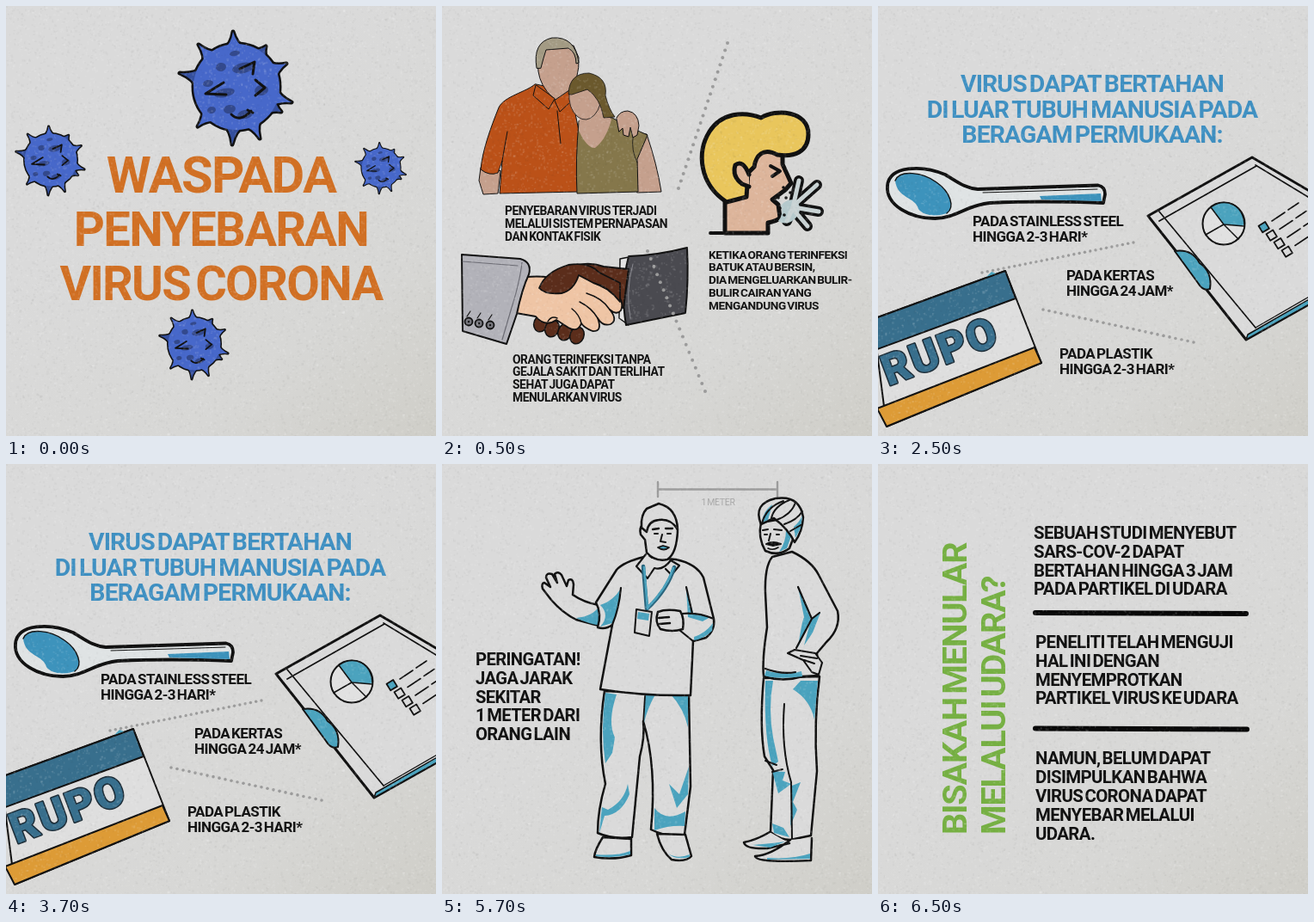
An HTML page with a canvas that plays this animation: 500x500 px, repeating every 8 s.

```html
<!DOCTYPE html>
<html lang="id">
<head>
<meta charset="utf-8">
<title>Waspada penyebaran virus corona</title>
<style>
html, body { margin: 0; width: 100%; height: 100%; overflow: hidden; background: #dcdcdc; }
canvas { display: block; width: 500px; height: 500px; }
</style>
</head>
<body>
<canvas id="stage" width="500" height="500"></canvas>
<script>
const stage = document.getElementById('stage');
const ctx = stage.getContext('2d');
const INK = '#111', TEAL = '#4ba3be', SKIN = '#c5a08d', PAPER = '#dadada', DOT = '#9b9b9b';

function shape(d, fill, stroke, width = 2) {
  const path = new Path2D(d);
  if (fill) { ctx.fillStyle = fill; ctx.fill(path); }
  if (stroke) { ctx.strokeStyle = stroke; ctx.lineWidth = width; ctx.stroke(path); }
}

function ellipse(x, y, rx, ry, fill, stroke, width = 2, turn = 0) {
  ctx.beginPath();
  ctx.ellipse(x, y, rx, ry, turn, 0, 7);
  if (fill) { ctx.fillStyle = fill; ctx.fill(); }
  if (stroke) { ctx.strokeStyle = stroke; ctx.lineWidth = width; ctx.stroke(); }
}

function text(lines, x, y, size, pitch, color = INK, weight = 700, align = 'left') {
  ctx.font = `${weight} ${size}px Roboto, Inter, sans-serif`;
  ctx.letterSpacing = -0.03 * size + 'px';
  ctx.wordSpacing = -0.11 * size + 'px';
  ctx.textAlign = align;
  ctx.fillStyle = color;
  lines.split('|').forEach((line, i) => ctx.fillText(line, x, y + i * pitch));
}

function dots(x1, y1, x2, y2, count, r) {
  for (let i = 0; i <= count; i++) {
    const k = i / count;
    ellipse(x1 + (x2 - x1) * k, y1 + (y2 - y1) * k, r, r, DOT);
  }
}

function local(x, y, scale, turn, draw) {
  ctx.save();
  ctx.translate(x, y);
  ctx.scale(scale, scale);
  ctx.rotate(turn);
  draw();
  ctx.restore();
}

function virus(x, y, scale) {
  const tips = [[-66, -16, 1], [34, -47, 1], [-5, 67, 1], [52, 29, 1], [-4, -64], [58, -27],
    [64, 18], [27, 60], [-45, 46], [-44, -49]];
  const spike = ([tx, ty, dark], outline) => {
    const a = Math.atan2(ty, tx);
    const at = (r, da) => `${r * Math.cos(a + da)},${r * Math.sin(a + da)}`;
    shape(`M${at(46, -.28)}Q${at(50, -.06)} ${tx},${ty}Q${at(50, .06)} ${at(46, .28)}Z`,
      outline ? null : dark ? '#344f9d' : '#4768ca', outline && INK, 5);
  };
  local(x, y, scale, 0, () => {
    tips.forEach(t => spike(t, true));
    ellipse(0, 0, 50, 50, null, INK, 5);
    tips.forEach(t => spike(t, false));
    ellipse(0, 0, 50, 50, '#4768ca');
    const spots = [[-18, -23, 6, 5], [8, -22, 13, 6], [-33, -4, 6, 4], [-14, 7, 12, 5], [29, 4, 8, 6],
      [-29, 27, 5, 4], [-8, 26, 7, 5], [10, 32, 9, 5], [-2, -39, 6, 3]];
    spots.forEach(([sx, sy, rx, ry]) => ellipse(sx, sy, rx, ry, '#33498d', null, 0, -.2));
    shape('M-15,-5L-36,8 -12,9 M22,-8L33,1 22,10 M4,-21L21,-29 19,-15 M-6,32Q4,42 17,28 M13,27L19,30', null, INK, 3);
  });
}

function titleScene() {
  virus(268, 94, 1);
  virus(52, 179, .61);
  virus(436, 188, .45);
  virus(219, 393, .61);
  const color = '#d17024';
  text('WASPADA', 250, 217, 59.5, 0, color, 700, 'center');
  text('PENYEBARAN|VIRUS CORONA', 250, 279, 56, 63, color, 700, 'center');
}

function couple() {
  const orange = '#bb5118', olive = '#85774b';
  shape('M45,188L43,203 48,219 65,218 68,192Z', SKIN, INK, 1);
  shape('M108,91C98,100 72,105 66,118C56,143 47,168 45,190Q55,198 65,194L70,180 67,218 158,216 160,150 150,100Z', orange, INK, 1);
  shape('M111,60L112,76Q114,92 128,106L136,113 148,101Q160,84 159,60L153,46H120Z', SKIN, INK, 1);
  shape('M110,72Q105,42 128,37Q155,35 159,66L156,67Q156,54 147,49L121,51Q118,60 115,72Z', '#a39b84', INK, 1);
  shape('M109,92L106,104 124,120 131,108Z M150,97L151,110 137,123 131,110Z', orange, INK, 1);
  shape('M134,122L138,160 M70,180L76,146', null, INK, 1);
  shape('M222,148L238,149Q250,184 255,216L227,217Z', SKIN, INK, 1);
  shape('M159,134Q155,180 157,218L228,216 227,178 239,150 214,139 198,130Z', olive, INK, 1);
  shape('M160,125L159,145Q169,166 178,165Q191,155 197,132L184,116Z', SKIN);
  shape('M148,99Q146,119 158,129Q168,136 177,127Q187,116 184,99L171,88Z', SKIN, INK, .8);
  shape('M147,102Q148,78 171,78Q193,83 190,104Q194,120 201,129L188,130Q184,107 169,97L151,103Z', '#6b592d', INK, .8);
  shape('M203,130Q207,122 216,122Q228,124 229,139L227,150 222,153 219,141 217,152 211,150 210,142 206,146Z', SKIN, INK, 1);
  shape('M222,153Q220,168 227,182', null, INK, .8);
}

function sneeze() {
  shape('M329,218V264H379V252Q390,250 393,246L391,231 384,225 399,214 406,206 396,184V165L360,148 330,190Z', '#ddb59b', INK, 5);
  shape('M331,228C299,207 296,170 311,146C325,124 351,122 371,130C388,119 426,122 426,149C426,170 409,176 390,173C373,164 365,174 363,187L356,194 354,222Z', '#e9c65c', INK, 5);
  shape('M357,196Q350,178 341,185Q337,198 349,207L357,210', '#ddb59b', INK, 5);
  shape('M382,186L393,192 384,198 M312,264H379', null, INK, 4);
  const rays = 'M408,234L415,203 M409,232L436,208 M409,234L438,239 M408,236L425,256 M408,234L401,250';
  shape(rays, null, INK, 12);
  shape('M394,232Q403,222 413,227Q420,238 410,248Q400,256 391,250Q398,241 394,232Z', '#b5c9cc');
  shape(rays, null, '#c9d3d4', 5);
  [[391, 223], [397, 211], [400, 223], [393, 235], [398, 243], [405, 217]].forEach(([x, y]) => ellipse(x, y, 1.8, 1.8, INK));
}

function handshake() {
  const light = '#efc5a5', dark = '#5b2d1b';
  shape('M207,294L222,291 217,371 206,363Z', '#e4e4e4', INK, 1.5);
  shape('M217,291Q250,290 285,281Q287,320 283,357L214,371Q207,330 217,291Z', '#4a4a50', INK, 2);
  shape('M222,300Q213,332 219,363', null, '#898990', 1);
  [[115, 369], [128, 375], [143, 379], [157, 383]].forEach(([x, y]) => ellipse(x, y, 8, 10, dark, INK, 1.5, .4));
  shape('M145,306Q166,295 188,303L217,306 211,351 190,343 145,333Z', dark, INK, 2);
  shape('M98,315Q122,313 140,319L160,311Q178,324 199,332Q213,342 208,354Q203,360 195,353Q205,365 196,370Q187,373 181,363Q187,379 175,378Q165,374 162,369Q158,380 147,374L133,365Q120,374 109,361L86,357Z', light, INK, 1.8);
  shape('M113,328Q120,309 147,301Q171,297 183,310L207,322V344Q193,326 176,322L159,313Q153,331 139,334Q120,336 113,328Z', dark, INK, 1.8);
  shape('M168,334Q187,340 195,353 M160,344Q174,351 181,363 M151,352Q160,359 162,369 M123,367Q127,360 134,363', null, INK, 1.5);
  shape('M23,289L91,294Q105,298 101,312Q93,329 87,358L75,393 24,378Z', '#b2b2b9', INK, 2);
  shape('M93,298Q91,319 80,354L70,388 M24,297L88,302', null, '#6c6c74', 1.2);
  [31, 43, 56].forEach((x, i) => {
    ellipse(x, 367 + i * 2, 4.5, 4.5, '#77777e', INK, 1.8);
    ellipse(x, 367 + i * 2, 1.2, 1.2, INK);
    shape(`M${x - 2},${361 + i * 2}l4,-6`, null, INK, 1.2);
  });
}

function spreadScene() {
  couple();
  sneeze();
  handshake();
  dots(332, 43, 275, 212, 20, 2);
  dots(239, 285, 306, 448, 18, 2);
  text('PENYEBARAN VIRUS TERJADI|MELALUI SISTEM PERNAPASAN|DAN KONTAK FISIK', 73, 243, 13.8, 14.8);
  text('KETIKA ORANG TERINFEKSI|BATUK ATAU BERSIN,|DIA MENGELUARKAN BULIR-|BULIR CAIRAN YANG|MENGANDUNG VIRUS', 310, 293.5, 13.6, 14.8);
  text('ORANG TERINFEKSI TANPA|GEJALA SAKIT DAN TERLIHAT|SEHAT JUGA DAPAT|MENULARKAN VIRUS', 82, 415.5, 13.8, 14.7);
}

function spoon() {
  shape('M11,209C13,185 52,185 78,196C92,204 101,212 116,213L256,208.5Q264,210 264,219L262,229Q190,226 130,229C104,231 90,247 66,247C38,247 9,232 11,209Z', '#dfe3e4', INK, 3.8);
  shape('M20,203C25,190 52,193 68,205C84,216 90,234 80,241C66,246 52,243 47,236C44,222 22,224 20,203Z', '#3d93bc');
  shape('M20,203C25,190 52,193 68,205C84,216 90,234 80,241', null, INK, 1.4);
  shape('M188,221L259,218 260,227 190,225Z', '#3d93bc');
  shape('M122,217L190,215 255,213', null, INK, 1);
}

function book() {
  shape('M435,176L314,244 428,388 510,342V220Z', PAPER, INK, 3);
  shape('M428,388L510,342V336L430,382Z', TEAL, INK, 1.5);
  shape('M440,186L327,250 M435,176L510,220 M439,185L510,228 M327,239L439,374', null, INK, 1.7);
  shape('M345,285Q365,282 374,299Q389,309 386,329Q378,332 372,322Z', TEAL, INK, 2);
  shape('M439,374L510,333', null, INK, 1.3);
  ellipse(402, 253, 24.5, 24.5, '#e1e1e1', INK, 2);
  shape('M402,254L387,234Q400,225 413,231Q426,238 426,256Z', TEAL, INK, 1.5);
  shape('M402,254L381,266 M402,254L419,271', null, INK, 1.5);
  for (let i = 0; i < 4; i++) {
    const x = 448 + i * 9, y = 257 + i * 9.5;
    local(x, y, 1, -.55, () => {
      ctx.lineWidth = 1.8;
      ctx.strokeStyle = INK;
      ctx.fillStyle = i ? PAPER : TEAL;
      ctx.fillRect(-4, -4, 9, 9);
      ctx.strokeRect(-4, -4, 9, 9);
    });
    shape(`M${x + 10},${y - 7}l15,-10m4,-3l12,-8`, null, INK, 1.6);
  }
}

function card() {
  const blue = '#386f8d';
  shape('M-6,364L148,308 190,415 10,489Z', '#dedede', INK, 2);
  shape('M-6,364L148,308 160,340 -6,401Z', blue, INK, 2);
  shape('M-1,468L182,397 190,415 10,489Z', '#dd9b36', INK, 2);
  shape('M126,315L132,309 137,311Z', TEAL);
  local(12, 442, 1, -.36, () => {
    ctx.font = '900 50px Roboto, Inter, sans-serif';
    ctx.letterSpacing = '2px';
    ctx.textAlign = 'left';
    ctx.lineWidth = 3;
    ctx.strokeStyle = '#1d2d38';
    ctx.fillStyle = blue;
    ctx.strokeText('RUPO', 0, 0);
    ctx.fillText('RUPO', 0, 0);
  });
}

function surfaceScene() {
  text('VIRUS DAPAT BERTAHAN|DI LUAR TUBUH MANUSIA PADA|BERAGAM PERMUKAAN:', 249, 100, 28.4, 29.7, '#3f90c2', 700, 'center');
  spoon();
  book();
  dots(297, 275, 121, 310, 28, 1.7);
  dots(192, 353, 367, 391, 25, 1.8);
  card();
  text('PADA STAINLESS STEEL|HINGGA 2-3 HARI*', 110, 256, 17, 18);
  text('PADA KERTAS|HINGGA 24 JAM*', 219, 319, 17, 18);
  text('PADA PLASTIK|HINGGA 2-3 HARI*', 211, 410, 17, 18);
}

const LINE = 2.5;

function speaker() {
  shape('M189,264Q180,322 190,372Q181,402 181,429Q199,437 221,434L230,340Q236,318 234,299Q250,352 243,425Q263,435 282,431L289,375 287,268Z', PAPER, INK, LINE);
  shape('M190,266L203,268Q192,300 201,318L198,336 190,348Q184,310 190,266Z M216,372Q212,392 193,402L186,399Q184,416 183,429L189,409Q208,408 218,384Z M236,268H248Q238,286 235,301Z M266,268L286,270 286,306Q281,284 266,268Z M247,400Q260,417 283,404L282,421Q264,420 247,426Z M287,352L276,384 264,372 273,400 286,384Z', TEAL);
  shape('M236,270L234,302', null, INK, 1.8);
  shape('M187,434Q178,448 177,457Q200,461 220,455V436Z M250,430Q255,450 267,460Q284,463 290,456L283,431Z', PAPER, INK, LINE);
  shape('M179,454Q203,456 219,450V454Q199,459 179,456Z M263,453Q274,460 288,454L288,457Q271,461 263,453Z', TEAL);
  shape('M182,164Q165,161 152,152L153,140Q152,132 147,135L145,142 139,129Q135,124 131,128L134,138 128,128Q121,126 121,132L126,143 119,138Q115,139 117,145L127,158Q140,173 156,181L186,189Z', PAPER, INK, LINE);
  shape('M156,179Q176,177 183,165L186,188Q170,186 156,179Z', TEAL);
  shape('M235,108Q211,114 203,123L179,161Q186,174 181,190Q190,193 198,187L184,262Q235,270 289,269L292,206 307,202Q318,193 316,180L304,132Q296,116 272,111Z', PAPER, INK, LINE);
  shape('M184,164Q198,160 208,145Q207,168 198,185L184,189Q196,176 184,164Z M284,145L292,173 312,178 303,183 286,178Z M293,201Q306,197 315,185L314,194Q305,203 293,205Z', TEAL);
  shape('M208,144Q206,168 198,187 M284,143L291,174 M279,174Q297,172 316,180 M276,193L292,206', null, INK, 2.2);
  shape('M251,172Q261,168 277,171Q282,179 280,192Q268,196 254,192Q247,184 251,172Z M252,179L264,178 M253,186L265,185', PAPER, INK, LINE);
  shape('M237,105L226,119 239,133 247,121Q257,124 266,112L276,118 267,129 260,122', PAPER, INK, 2.2);
  shape('M234,119L238,168 M270,120Q263,145 239,168', null, '#29647c', 4.5);
  shape('M235,120L239,168 M269,121Q261,145 239,167', null, TEAL, 2.5);
  shape('M226,169L244,172 241,200 224,196Z', PAPER, INK, 2);
  shape('M228,172L241,174 240,182 227,180Z', TEAL);
  shape('M234,70Q229,74 231,82L236,88 238,103Q248,114 262,111Q273,104 274,77L269,58 240,57Z', PAPER, INK, LINE);
  shape('M232,74Q231,59 238,52L252,46Q273,51 274,76Q266,63 252,65Q240,66 238,79Z', PAPER, INK, LINE);
  shape('M245,76L252,75 M260,75L268,75', null, INK, 2.3);
  shape('M247,81L251,81 M262,81L266,81 M256,82L254,90 260,91', null, INK, 2);
  shape('M251,97L257,95 264,97Q258,102 251,97Z', TEAL, INK, 1.8);
}

function listener() {
  shape('M374,249Q369,305 375,340L385,356 382,428Q393,437 405,437L429,432 436,357Q432,300 439,247Z', PAPER, INK, LINE);
  shape('M376,252L385,252Q379,285 385,318L391,346 384,351Q374,318 376,252Z M417,252H437L433,297Q428,274 408,262Z M384,357L399,358 396,368 406,372 391,383Z M407,374L417,370 408,393 413,402 405,421Z M384,418L397,423 404,434 386,429Z', TEAL);
  shape('M398,279Q394,330 406,370L407,437 M376,345L389,350 M384,358L396,355', null, INK, 2);
  shape('M381,428Q366,437 351,440Q353,448 378,447L404,441 M405,437Q382,455 364,456Q365,464 429,461L430,435', PAPER, INK, LINE);
  shape('M361,443Q386,441 399,439L382,446Z M378,458Q407,460 428,453V459L378,460Z', TEAL);
  shape('M384,108Q375,119 376,150L378,190Q372,228 374,247Q397,254 419,247L438,246 436,220 447,207Q464,191 460,171L438,129Q430,113 407,102Z', PAPER, INK, LINE);
  shape('M414,143L429,181 414,213Q418,185 421,178Z M429,181L440,173 431,196 421,211Z M377,240Q400,247 418,241L419,247Q391,251 375,246Z', TEAL);
  shape('M414,143L430,180 412,214 M430,180L439,173 M376,238Q395,245 411,242', null, INK, 2.2);
  shape('M410,216L402,220 420,228 430,242 438,245 442,231 434,220Z M421,228L433,232 M417,223L436,226', PAPER, INK, 2.1);
  shape('M371,68Q367,86 376,101Q391,108 404,98L410,82 401,63Z', PAPER, INK, LINE);
  shape('M400,77L406,84 401,98 392,102Q400,91 400,77Z', TEAL);
  shape('M371,70Q361,46 388,40Q416,36 420,62Q419,79 410,91Q403,76 386,63Z', PAPER, INK, LINE);
  shape('M372,68Q373,55 384,47L379,65Z M409,73Q416,67 419,60L417,74 411,86Z', TEAL);
  shape('M372,69Q377,50 397,43 M383,63Q386,49 404,42 M389,65Q406,59 411,45 M398,70Q413,65 419,55 M405,78L419,70', null, INK, 2);
  shape('M373,77L379,76 M386,76L395,77 M375,82L378,82 M389,82L392,82 M382,81L380,89', null, INK, 2);
  shape('M377,93Q384,89 394,93L385,95Z', INK, INK, 2);
  shape('M379,98Q385,101 391,97', null, INK, 1.6);
}

function distanceScene() {
  shape('M251,29.5H390M251,21V38M390,21V38', null, '#9c9c9c', 2.4);
  text('1 METER', 321, 48, 10.5, 0, '#a7a7a7', 400, 'center');
  speaker();
  listener();
  text('PERINGATAN!|JAGA JARAK|SEKITAR|1 METER DARI|ORANG LAIN', 39, 234, 20.2, 21.8);
}

function airScene() {
  local(103, 431, 1, -Math.PI / 2, () =>
    text('BISAKAH MENULAR|MELALUI UDARA?', 0, 0, 39.5, 45, '#76b043', 700));
  text('SEBUAH STUDI MENYEBUT|SARS-COV-2 DAPAT|BERTAHAN HINGGA 3 JAM|PADA PARTIKEL DI UDARA', 181, 87, 20.4, 21.8);
  text('PENELITI TELAH MENGUJI|HAL INI DENGAN|MENYEMPROTKAN|PARTIKEL VIRUS KE UDARA', 183, 214, 20.4, 21.8);
  text('NAMUN, BELUM DAPAT|DISIMPULKAN BAHWA|VIRUS CORONA DAPAT|MENYEBAR MELALUI|UDARA.', 183, 349, 20.4, 22);
  shape('M183,173L428,174M183,307.5L429,308.5', null, '#080808', 6);
}

// Seeded paper grain, laid softly over everything.
function makeGrain() {
  const sheet = document.createElement('canvas');
  sheet.width = sheet.height = 500;
  const g = sheet.getContext('2d');
  let seed = 19;
  const rnd = () => (seed = seed * 16807 % 2147483647) / 2147483647;
  for (let i = 0; i < 16000; i++) {
    g.fillStyle = rnd() < .6 ? 'rgba(255,255,255,.09)' : 'rgba(80,80,80,.03)';
    g.fillRect(rnd() * 500, rnd() * 500, 1 + rnd() * 2, 1 + rnd() * 2);
  }
  return sheet;
}

const grain = makeGrain();
const paper = ctx.createLinearGradient(200, 150, 500, 500);
paper.addColorStop(0, '#dadada');
paper.addColorStop(.6, '#d7d7d5');
paper.addColorStop(1, '#cfcec8');

const scenes = [[0, titleScene], [500, spreadScene], [2500, surfaceScene], [4500, distanceScene], [6500, airScene]];
let shown = null;

function render(now) {
  const t = now % 8000;
  const scene = scenes.filter(([start]) => t >= start).pop()[1];
  if (scene !== shown) {
    shown = scene;
    ctx.lineCap = ctx.lineJoin = 'round';
    ctx.fillStyle = paper;
    ctx.fillRect(0, 0, 500, 500);
    scene();
    ctx.drawImage(grain, 0, 0);
  }
  requestAnimationFrame(render);
}
render(performance.now());
</script>
</body>
</html>
```
